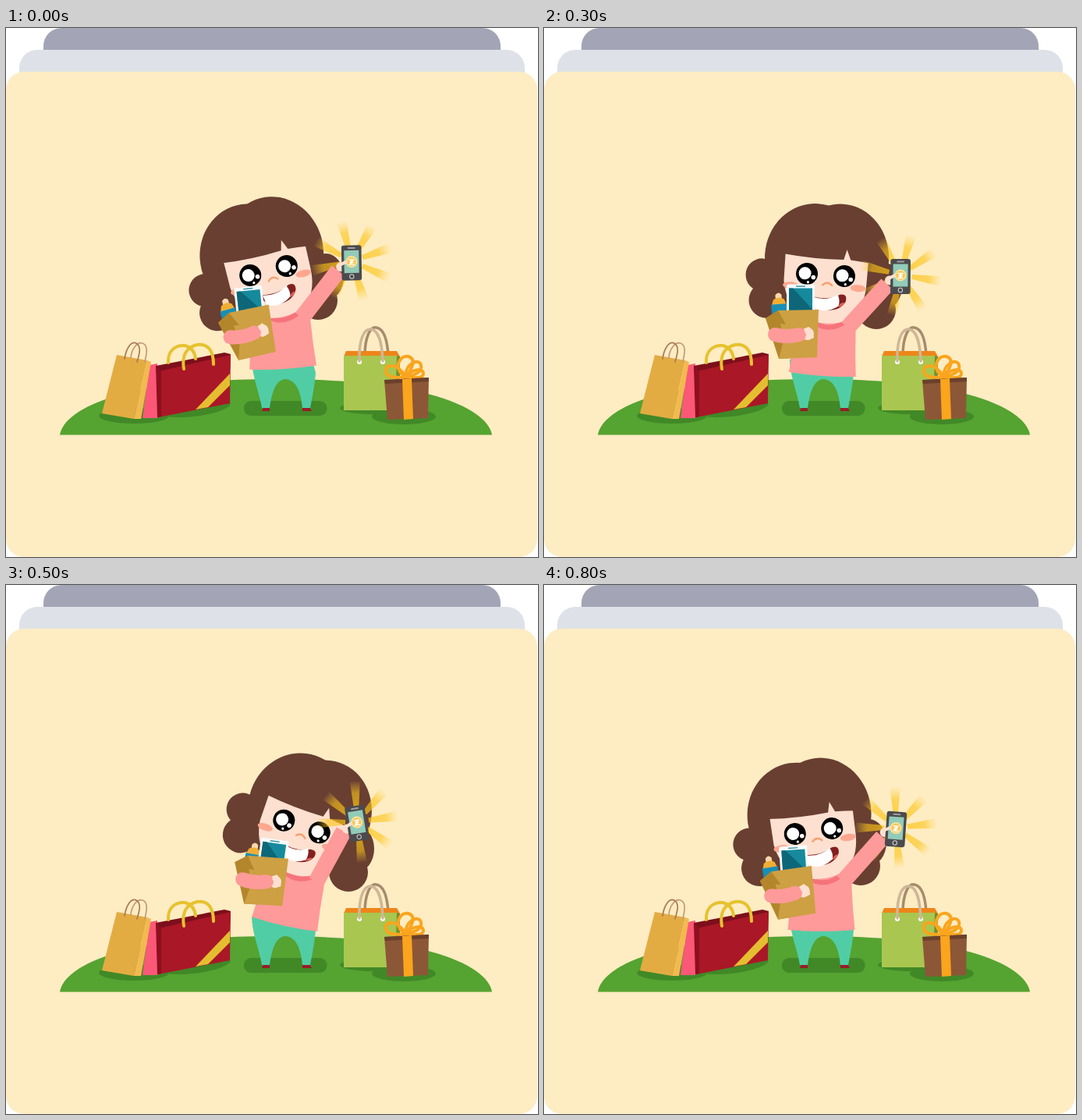
These frames come from a looping animation (682 by 678 pixels, 0.9 s). An HTML page:

```html
<!DOCTYPE html>
<html lang="en">
<head>
<meta charset="utf-8">
<title>Happy shopper</title>
<style>
  html, body { margin: 0; width: 100%; height: 100%; overflow: hidden; background: #fff; }
  svg { display: block; width: 100%; height: 100%; }
  .line { fill: none; stroke-linecap: round; stroke-linejoin: round; }
  .hair { fill: #693f31; }
  .skin { fill: #fee0d0; }
  .shirt { fill: #fe9a99; }
  .shade { fill: #418827; }
</style>
</head>
<body>
<svg viewBox="0 0 682 678" preserveAspectRatio="none">
  <defs>
    <radialGradient id="glow" gradientUnits="userSpaceOnUse" cx="0" cy="0" r="53">
      <stop offset=".3" stop-color="#fcc517" stop-opacity=".7"/>
      <stop offset=".7" stop-color="#fcc517" stop-opacity=".6"/>
      <stop offset="1" stop-color="#fcd03a" stop-opacity="0"/>
    </radialGradient>
    <g id="eye">
      <circle r="14"/>
      <g fill="#fff"><circle cx="-2.500" cy="-.5" r="8"/><circle cx="8.500" cy="4" r="2.800"/><circle cx="2" cy="10.500" r="1.600"/></g>
    </g>
  </defs>

  <rect x="48" width="586" height="90" rx="23" fill="#a3a4b6"/>
  <rect x="17" y="28" width="648" height="90" rx="23" fill="#dee2e8"/>
  <rect y="56" width="681" height="622" rx="23" fill="#feecc3"/>

  <path fill="#55a331" d="M69 521.500C72 498 122 450 346 450C568 450 620 498 623 521.500Z"/>
  <g class="shade">
    <ellipse cx="164" cy="497" rx="45" ry="10"/>
    <ellipse cx="239" cy="486" rx="49" ry="12" transform="rotate(-6 239 486)"/>
    <ellipse cx="471" cy="487" rx="43" ry="8"/>
    <ellipse cx="510" cy="498" rx="41" ry="10"/>
    <rect x="305" y="478" width="106.500" height="19" rx="9"/>
  </g>

  <!-- bags on the left -->
  <path fill="#fb5878" d="M184 432L194 430L194 500L175 500Z"/>
  <path fill="#e3ac42" d="M142 419L181 426L164 501L123 494Z"/>
  <path fill="#f3b950" d="M181 426L186 428L173 501L164 501Z"/>
  <g class="line" stroke-width="1.700">
    <path stroke="#c39a78" d="M160 423C161 411 168 402 175 404C183 407 180 418 178 428"/>
    <path stroke="#a8795a" d="M152 424C154 411 160 401 167 404C174 408 171 418 168 428"/>
  </g>
  <path fill="#7d0f1c" d="M192 433L280 416L288 418L287 440L195 460Z"/>
  <path class="line" stroke="#e6c22f" stroke-width="4" d="M208 429C207 413 218 406 229 407C238 409 242 415 243 424"/>
  <path fill="#aa1727" d="M196 440L288 419L287 481L195 499Z"/>
  <path fill="#8d101e" d="M192 433L199 440L199 498L194 499Z"/>
  <path fill="#e5bd31" d="M287 443L287 458L259 486L243 489Z"/>
  <path class="line" stroke="#e6c22f" stroke-width="4" d="M228 437C225 419 232 409 245 406C260 404 266 415 266 431"/>

  <!-- green bag and gift on the right -->
  <path class="line" stroke="#a68b6c" stroke-width="3.500" d="M460 420C460 396 467 382 475 384C485 386 489 402 490 420"/>
  <path fill="#ee8519" d="M436 414L501 414L505 421L433 421Z"/>
  <path fill="#708e31" d="M500 420L505 421L505 488L499 490Z"/>
  <path fill="#a9c650" d="M433 420H501L499 490H433Z"/>
  <g fill="#fff"><circle cx="453" cy="428" r="3"/><circle cx="483" cy="428" r="3"/></g>
  <path class="line" stroke="#cdb798" stroke-width="3.500" d="M453 427C452 399 459 385 468 386C479 388 482 406 483 427"/>
  <g class="line" stroke="#faa51d" stroke-width="4">
    <path d="M513 448C494 437 505 418 516 421C528 425 518 439 513 448"/>
    <path d="M513 448C500 426 484 432 487 441C490 450 502 447 513 448"/>
    <path d="M513 448C510 431 529 422 532 432C534 442 523 444 513 448"/>
    <path d="M513 448C519 437 535 435 535 443C535 450 522 448 513 448"/>
  </g>
  <path fill="#8c5737" d="M485 451L542 448L541 500L489 502Z"/>
  <path fill="#6c402b" d="M485 451L542 448V453L486 456Z"/>
  <path fill="#faa51d" d="M508 450L520 449L522 501L510 502Z"/>

  <!-- girl -->
  <g id="curl" class="hair">
    <ellipse rx="23" ry="30"/>
    <circle cx="-10" cy="30" r="25"/>
  </g>
  <g id="hair" class="hair">
    <ellipse cx="-16" cy="-22" rx="64" ry="68.500"/>
    <ellipse cx="16" cy="-22" rx="63" ry="70"/>
    <path d="M-80-22H78L70 38L-66 52Z"/>
    <circle cx="-82" cy="5" r="21"/>
    <circle cx="-74" cy="37" r="23"/>
  </g>
  <g fill="#9b1b2a">
    <path d="M328 491L330 486H338V491Z"/><path d="M380 491V486H389L392 491Z"/>
  </g>
  <path fill="#51cda5" d="M316 424H392L397 442C396 455 393 472 390 487H380C378 466 372 451 358 450C346 451 341 466 338 487H328C325 468 316 448 315 426Z"/>
  <g id="body">
    <path class="shirt" d="M-44 2C-40-30-42-58-22-68L26-72Q38-66 38-52Q39-25 42 2Q0 6-44 2Z"/>
    <path class="line" stroke="#f6737b" stroke-width="6" d="M-18-65Q4-50 27-70"/>
  </g>
  <g id="face">
    <path class="skin" d="M-53-30V10C-48 45-25 62 5 62C35 62 52 45 53 10L54-30L26-42Z"/>
    <path class="hair" d="M-56-24Q-16-19 22-21L25.500-34L31-21Q44-20 57-18L54-50H-54Z"/>
    <g fill="#fda78f"><ellipse cx="-44" cy="16" rx="10" ry="4.500"/><ellipse cx="42.500" cy="14.500" rx="10" ry="4.500"/></g>
    <use href="#eye" x="-24"/><use href="#eye" x="24"/>
    <path class="line" stroke="#f5a374" stroke-width="2.500" d="M-3 13Q3 7 9 13"/>
    <path fill="#83201f" d="M-20 27Q2 34 20 24Q30 22 28 32Q22 45 3 45Q-14 45-20 27Z"/>
    <path fill="#e0605c" d="M19 40Q20 34 27 34Q24 39 19 40Z"/>
    <path fill="#fff" d="M-15 29Q4 34 17 24Q21 31 19 39Q2 51-13 42Z"/>
  </g>
  <g id="rays" fill="url(#glow)"></g>
  <line id="arm" stroke="#fe9a99" stroke-width="21"/>

  <g id="phone">
    <circle class="skin" cx="-14" cy="5" r="6"/>
    <rect x="-12.800" y="-22.500" width="25.600" height="45" rx="3" fill="#4b4a4d"/>
    <rect x="-5" y="-20" width="10" height="2" rx="1" fill="#a1a0a0"/>
    <rect x="-9.500" y="-16" width="19" height="29" fill="#92cbb8"/>
    <circle cy="-1.500" r="7.500" fill="#ffe49c"/>
    <circle cy="-1.500" r="5.800" fill="#f8c653"/>
    <path class="line" stroke="#fff" stroke-width="1.500" d="M-3-4H3L-2-1H2L-3 2H3"/>
    <circle cy="17.500" r="2.700" fill="none" stroke="#d5d5d5" stroke-width="1"/>
    <path class="line" stroke="#fee0d0" stroke-width="4" d="M-14 2L-8-1"/>
  </g>

  <g id="bottle">
    <rect x="-10" y="2" width="20" height="22" rx="4" fill="#178fb5"/>
    <path fill="#f8d8ac" d="M-4-3V-8Q0-13 4-8V-3Z"/>
    <path fill="#efae35" d="M-7-2Q0-7 7-2L9 4H-9Z"/>
  </g>
  <g id="tablet">
    <rect x="-18" width="36" height="46" rx="2" fill="#f6fbfc"/>
    <rect x="-6" y="1.800" width="12" height="1.500" fill="#3b94a6"/>
    <rect x="-15" y="5" width="30" height="38" fill="#168a9c"/>
    <path fill="#0d6778" d="M-15 5H-10L15 32V43H-15Z"/>
  </g>
  <g id="box">
    <path fill="#b3862c" d="M-41-21L-25-31L-5 30L-24 31Z"/>
    <path fill="#cda043" d="M-25-31L27-32L25 29L-24 31L-18 8Z"/>
    <path fill="#b3862c" d="M-25-31L-41-21L-27-15L-15-13Z"/>
    <circle class="skin" cx="13" cy="-1" r="8"/>
    <path class="line" stroke="#fe9a99" stroke-width="18" d="M-29 0Q-14 4 2 0"/>
    <path class="line" stroke="#fee0d0" stroke-width="4" d="M11-4L14-8M14 3L19 3"/>
  </g>
</svg>
<script>
const $ = id => document.getElementById(id);
const STEP = 100;
const HAIR_SWAY = 0.2; // sideways pixels per degree of head tilt

// Each part: x, y, angle. "rays" holds only an angle.
const poses = [
  { head: [336.5, 311, -14.3], curl: [410, 319], body: [356, 433, -3.5], box: [316, 391, -10.5],
    tablet: [310, 331.5, -6], bottle: [283, 357, -15], phone: [443, 301, -1], rays: [-13] },
  { head: [344.5, 314.5, -8.5], curl: [416, 330], body: [356.5, 440, 0], box: [320, 395, -7],
    tablet: [319, 334.5, -4], bottle: [289, 358, -9], phone: [451, 313, 4], rays: [-14] },
  { head: [361, 316.5, 3.6], curl: [436, 331], body: [358, 442, 4], box: [325, 393, 0],
    tablet: [329, 328.5, 0], bottle: [301, 350, -4], phone: [457, 318.5, 0.5], rays: [-28] },
  { head: [379, 309.5, 19], curl: [449, 338], body: [358.5, 433, 12.5], box: [332, 380, 5.5],
    tablet: [345, 326, 8], bottle: [318, 341, 10], phone: [450, 305.5, -9], rays: [-2] },
  { head: [366, 314, 7], curl: [439, 340], body: [358.5, 439, 6], box: [328, 390, 1],
    tablet: [335.5, 341.5, 4], bottle: [309, 349, 0], phone: [455, 315.5, 2], rays: [0] }
];

const between = (from, to) => Object.fromEntries(
  Object.keys(from).map(part => [part, from[part].map((v, i) => (v + to[part][i]) / 2)]));

const [left, midLeft, midRight, right, returning] = poses;
const settled = { ...midLeft, head: [345.5, 315.5, -8.5], rays: [0] };
const cycle = [left, midLeft, between(midLeft, midRight), midRight, between(midRight, right),
  right, returning, between(returning, settled), settled];

$('rays').innerHTML = [-91, -47, -6, 37, 85, 130, 180, 222]
  .map(a => `<path d="M15-3L52-6.500V6.500L15 3Z" transform="rotate(${a})"/>`).join('');

const place = (id, [x, y, angle = 0]) =>
  $(id).setAttribute('transform', `translate(${x} ${y}) rotate(${angle})`);

function drawArm([bx, by, angle], [px, py]) {
  const r = angle * Math.PI / 180, c = Math.cos(r), s = Math.sin(r);
  const shoulder = [bx + 27 * c + 60 * s, by + 27 * s - 60 * c];
  const ends = { x1: shoulder[0], y1: shoulder[1], x2: px - 17, y2: py + 10 };
  for (const key in ends) $('arm').setAttribute(key, ends[key]);
}

function show(pose) {
  const [x, y, tilt] = pose.head;
  place('hair', [x + HAIR_SWAY * tilt, y, tilt]);
  place('face', pose.head);
  for (const part of ['curl', 'body', 'box', 'tablet', 'bottle', 'phone']) place(part, pose[part]);
  place('rays', [pose.phone[0], pose.phone[1] - 2, pose.rays[0]]);
  drawArm(pose.body, pose.phone);
}

let shown = 0;
show(cycle[0]);
const start = performance.now();
function tick() {
  const step = Math.floor((performance.now() - start) / STEP) % cycle.length;
  if (step !== shown) show(cycle[shown = step]);
  requestAnimationFrame(tick);
}
requestAnimationFrame(tick);
</script>
</body>
</html>
```
